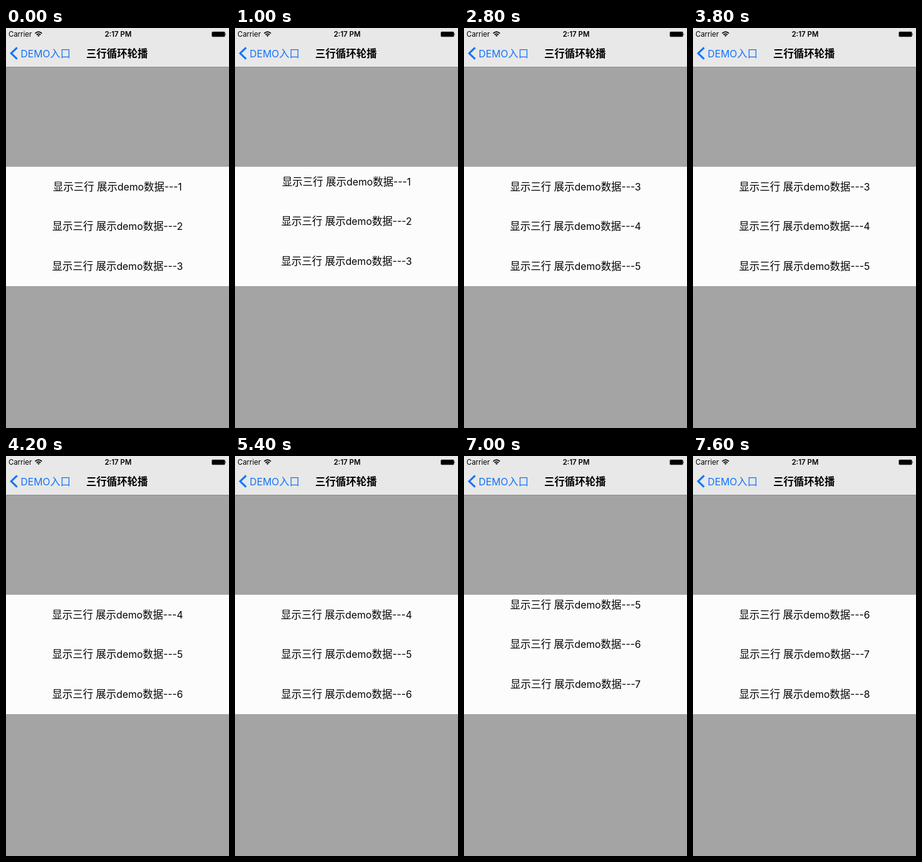
These frames come from a looping animation (358 by 640 pixels, 8 s). An HTML page:

```html
<!DOCTYPE html>
<html lang="zh-CN">
<head>
<meta charset="utf-8">
<style>
  html, body { margin: 0; height: 100%; overflow: hidden; }
  svg { display: block; }
  text { font: 16.5px Inter, "Noto Sans CJK SC", "Noto Sans CJK", sans-serif; }
  .latin { font-size: 15.8px; }
  .status { font-size: 11.5px; }
  .bold { font-weight: 600; }
</style>
</head>
<body>
<svg width="358" height="640">
  <rect width="358" height="640" fill="#a4a4a4"/>
  <rect width="358" height="62" fill="#e8e8e8"/>
  <rect y="62" width="358" height="1" fill="#8c8c8c"/>

  <text class="status" x="4" y="14">Carrier</text>
  <g fill="none" stroke="#000" stroke-width="1.7">
    <path d="M46.8 8.6Q52.2 3.6 57.6 8.6M48.9 10.8Q52.2 7.8 55.5 10.8"/>
    <path d="M50.3 11.9Q52.2 10.4 54.1 11.9L52.2 13.9Z" fill="#000" stroke="none"/>
  </g>
  <text class="status bold" x="180" y="14" text-anchor="middle">2:17 PM</text>
  <rect x="330.5" y="6" width="21" height="8" rx="1.5" stroke="#555" stroke-width=".6"/>
  <path d="M352.4 8.2q1.6 1.8 0 3.6z"/>

  <path d="M17.8 31.3L8.3 40.5L17.8 49.7" fill="none" stroke="#1273fb" stroke-width="3"/>
  <text x="23.5" y="46.5" fill="#1273fb"><tspan class="latin">DEMO</tspan>入口</text>
  <text class="bold" x="178.3" y="46.5" text-anchor="middle">三行循环轮播</text>

  <svg y="222" width="358" height="191">
    <rect width="358" height="191" fill="#fcfcfc"/>
    <g id="list"></g>
  </svg>
</svg>
<script>
const LOOP = 8000, TICK = 200;
const ROW = 191 / 3, ROWS = 8;
const FIRST = 951, PERIOD = 1494.5, SLIDE = 213;

const list = document.getElementById('list');
list.innerHTML = Array.from({ length: ROWS }, (_, i) =>
  `<text x="179" y="${i * ROW + 37.6}" text-anchor="middle">显示三行<tspan class="latin"> </tspan>展示` +
  `<tspan class="latin">demo</tspan>数据<tspan class="latin">---${i + 1}</tspan></text>`
).join('');

const ease = x => (1 - Math.cos(Math.PI * x)) / 2;

// Scroll position in rows: one eased slide per period, then a rest.
function position(time) {
  const since = time - FIRST;
  if (since < 0) return 0;
  return Math.floor(since / PERIOD) + ease(Math.min(1, since % PERIOD / SLIDE));
}

function draw() {
  const time = Math.floor(performance.now() % LOOP / TICK) * TICK;
  list.setAttribute('transform', `translate(0 ${-position(time) * ROW})`);
  requestAnimationFrame(draw);
}
draw();
</script>
</body>
</html>
```
